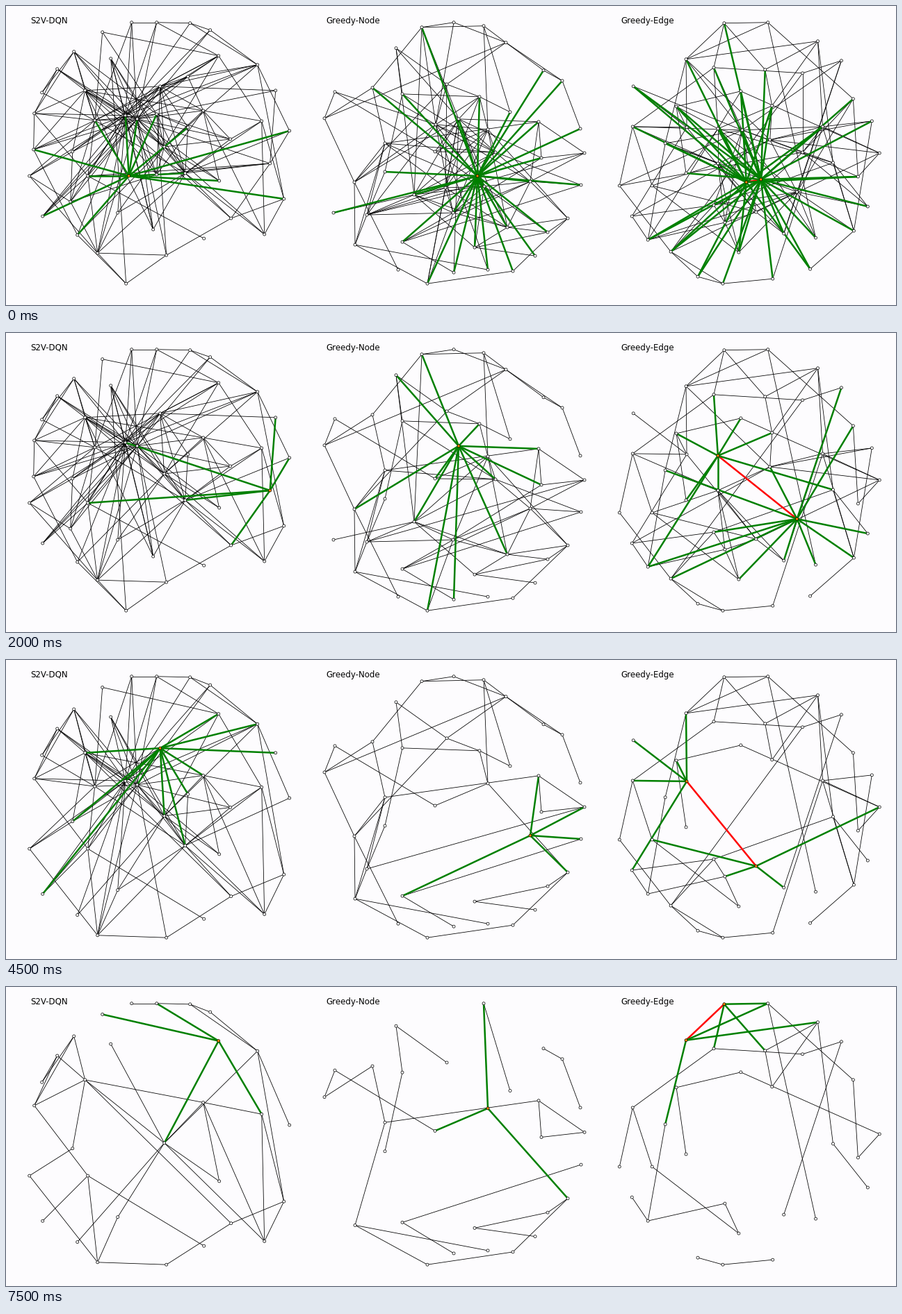
Write a matplotlib script that moves like this. It is 1280x431 px and loops after 8 s.

```python
import matplotlib.pyplot as plt
import numpy as np
from matplotlib.animation import FuncAnimation
from matplotlib.collections import LineCollection

W, H, DPI = 1280, 431, 80
PX = 72 / DPI
TOP, SPAN_X, SPAN_Y = 23.7, 374, 376.5
FRAMES, INTERVAL = 16, 500


class Graph:
    """A graph that loses the hubs of one cover step after another."""

    def __init__(self, title, left, steps, hold, points):
        self.title, self.left = title, left
        self.steps, self.hold = steps, hold
        self.points = np.array(points, float)
        self.edges = []

    def link(self, a, b):
        edge = (min(a, b), max(a, b))
        if edge not in self.edges:
            self.edges.append(edge)

    def star(self, hub, *others):
        for other in others:
            self.link(hub, other)

    def path(self, *nodes):
        for a, b in zip(nodes, nodes[1:]):
            self.link(a, b)

    def setup(self, ax):
        ax.text(self.left + 2, 25, self.title, fontsize=11.8 * PX,
                family="DejaVu Sans", va="baseline")
        self.lines = ax.add_collection(LineCollection([], zorder=1))
        self.dots = ax.scatter([], [], s=13, lw=0.7 * PX,
                               edgecolors="black", zorder=2)

    def draw(self, frame):
        step = frame // self.hold
        gone = {n for hubs in self.steps[:step] for n in hubs}
        hubs = set(self.steps[step])
        alive = [e for e in self.edges if not gone & set(e)]
        nodes = sorted({n for e in alive for n in e})

        # the view always fits the nodes that are left
        low = self.points[nodes].min(axis=0)
        high = self.points[nodes].max(axis=0)
        pos = (self.points - low) / (high - low) * (SPAN_X, SPAN_Y)
        pos += (self.left, TOP)

        touched = lambda e: len(hubs & set(e))
        rank = {0: 0, 2: 1, 1: 2}
        alive.sort(key=lambda e: rank[touched(e)])
        self.lines.set_segments([pos[list(e)] for e in alive])
        self.lines.set_color([("black", "green", "red")[touched(e)] for e in alive])
        self.lines.set_linewidth([(2.5 if touched(e) else 0.8) * PX for e in alive])

        nodes.sort(key=lambda n: n in hubs)
        self.dots.set_offsets(pos[nodes])
        self.dots.set_facecolor(["#ff8c00" if n in hubs else "white" for n in nodes])
        return self.lines, self.dots


def learned():
    order = [30, 46, 23, 14, 33, 38, 40, 26, 45, 13, 19, 31, 21, 22, 20, 5]
    g = Graph("S2V-DQN", 33.7, [[n] for n in order], 1, [
        (181, 24), (217, 24), (265, 25), (294, 35), (139, 38), (306, 72),
        (362, 85), (98, 66), (151, 76), (74, 91), (52, 125), (41, 155),
        (114, 122), (222, 116), (262, 102), (388, 122), (284, 151), (368, 166),
        (408, 180), (323, 192), (128, 165), (172, 158), (189, 163), (217, 156),
        (262, 175), (228, 203), (40, 207), (96, 210), (34, 245), (118, 245),
        (177, 245), (258, 241), (307, 252), (380, 227), (400, 278), (324, 306),
        (372, 329), (53, 303), (93, 282), (161, 298), (212, 322), (103, 330),
        (132, 356), (231, 359), (285, 335), (173, 400), (217, 243)])
    g.star(30, 26, 37, 41, 29, 20, 21, 22, 23, 24, 18, 34, 32, 31)
    g.star(46, 38, 12, 16, 25, 31, 21, 22, 29, 33, 13)
    g.star(23, 4, 7, 15, 19, 20, 22, 24, 31, 25, 43)
    g.star(14, 5, 6, 13, 16, 20, 21, 22)
    g.star(33, 15, 18, 29, 31, 35, 21)
    g.star(38, 28, 27, 21, 22, 42, 20)
    g.star(40, 8, 12, 21, 22, 31)
    g.star(26, 11, 12, 20, 21, 22, 41)
    g.star(45, 8, 41, 42, 43)
    g.star(13, 37, 15, 21, 5, 6, 24, 25, 22, 12, 16, 27, 31)
    g.star(19, 16, 17, 22, 25, 31)
    g.star(31, 8, 20, 24, 17, 18, 35, 36, 39, 42, 25, 22)
    g.star(21, 0, 1, 2, 3, 5, 6, 7, 8, 9, 11, 12, 22, 25, 27, 28, 29, 37, 39,
           41, 42)
    g.star(22, 0, 1, 3, 6, 7, 8, 9, 12, 16, 20, 25, 27, 29, 32, 37, 42, 43)
    g.star(20, 0, 4, 7, 10, 11, 12, 28, 29, 5)
    g.star(5, 4, 1, 25, 17)
    g.path(0, 1, 2, 3, 6, 2)
    g.path(11, 7, 10, 9, 11, 12, 16, 17, 34, 36, 16, 25, 6, 34, 35, 43, 42)
    g.path(11, 29, 42, 28, 27, 12, 25, 32, 16)
    g.path(7, 12, 9)
    g.path(12, 35)
    g.path(8, 25, 36, 17)
    g.path(41, 25, 39, 42)
    g.path(37, 29, 44)
    g.path(6, 18)
    return g


def greedy_node():
    order = [27, 28, 16, 26, 17, 34, 44, 21, 31, 29, 3, 11, 25, 32, 0, 18]
    g = Graph("Greedy-Node", 458, [[n] for n in order], 1, [
        (598, 31), (644, 24), (687, 29), (719, 53), (561, 61), (773, 93),
        (800, 108), (527, 118), (473, 124), (570, 127), (634, 113), (681, 131),
        (725, 153), (458, 162), (766, 167), (826, 177), (618, 171), (651, 163),
        (693, 178), (832, 212), (770, 219), (704, 211), (617, 210), (545, 198),
        (545, 239), (501, 254), (632, 262), (678, 245), (688, 260), (754, 253),
        (827, 258), (587, 272), (519, 301), (471, 298), (643, 298), (502, 344),
        (570, 340), (564, 380), (606, 400), (644, 384), (693, 380), (729, 382),
        (674, 348), (761, 360), (721, 319), (779, 326), (808, 306)])
    g.star(27, 0, 7, 9, 33, 31, 24, 36, 38, 39, 34, 40, 41, 43, 45, 44, 30, 29,
           20, 15, 14, 6, 5, 12, 11, 17, 42, 28)
    g.star(28, 16, 17, 22, 23, 26, 29, 31, 34, 42, 43, 44, 45, 32)
    g.star(16, 0, 1, 7, 8, 10, 11, 18, 21, 29, 25, 32, 34, 40)
    g.star(26, 38, 10, 11, 17, 18, 21, 23, 31, 32, 34, 44)
    g.star(17, 0, 4, 11, 14, 20, 21, 22, 44, 39, 38, 31, 25)
    g.star(34, 18, 20, 31, 32, 36, 38, 44, 29)
    g.star(44, 18, 29, 31, 42, 45, 46)
    g.star(21, 9, 18, 22, 23, 30, 31, 29)
    g.star(31, 0, 4, 18, 33, 32, 42)
    g.star(29, 14, 19, 30, 36, 46)
    g.star(3, 1, 2, 5, 6, 10, 13)
    g.star(11, 9, 10, 12, 18)
    g.star(25, 10, 13, 23, 35, 37)
    g.star(32, 19, 23, 24, 35)
    g.star(0, 1, 2, 7)
    g.star(18, 2, 22, 46)
    g.path(2, 12)
    g.path(10, 4, 9, 24)
    g.path(22, 8, 13, 7, 23, 35, 38, 41, 46, 45, 42, 43)
    g.path(23, 14, 19, 20, 14)
    g.path(5, 6, 15)
    g.path(30, 36, 39)
    g.path(35, 40)
    return g


def greedy_edge():
    pairs = [(29, 30), (17, 20), (16, 31), (19, 24),
             (15, 33), (32, 37), (18, 41), (0, 3)]
    g = Graph("Greedy-Edge", 882.3, pairs, 2, [
        (1033, 25), (1096, 24), (1168, 51), (978, 77), (1202, 79), (1018, 89),
        (1092, 92), (1146, 97), (902, 116), (1057, 123), (1102, 144),
        (964, 145), (1219, 134), (1246, 166), (901, 174), (979, 175),
        (1024, 177), (1059, 179), (1175, 174), (1099, 193), (1146, 211),
        (948, 198), (1257, 212), (1190, 226), (1024, 227), (978, 241),
        (1226, 246), (929, 259), (882, 259), (1065, 254), (1086, 250),
        (1138, 268), (1018, 287), (1079, 297), (1034, 312), (900, 303),
        (923, 337), (956, 354), (1054, 355), (1119, 328), (1165, 334),
        (1220, 324), (1240, 289), (1157, 379), (1103, 393), (1031, 400),
        (995, 390)])
    for a, b in pairs:
        g.link(a, b)
    g.star(29, 3, 8, 9, 11, 14, 16, 18, 21, 24, 26, 36, 37, 38, 46, 10, 43)
    g.star(30, 0, 5, 6, 8, 9, 10, 11, 12, 13, 16, 17, 25, 26, 32, 36, 37, 38,
           39, 40, 41, 42, 43, 44, 45, 46, 18)
    g.star(17, 3, 5, 8, 14, 21, 28, 4, 23, 18, 32, 34, 33, 40)
    g.star(20, 7, 12, 42, 26, 28, 34, 18)
    g.star(16, 5, 9, 10, 11, 23, 24, 25, 36)
    g.star(31, 4, 12, 19, 21, 32, 36, 37, 38, 39, 40, 41, 42)
    g.star(19, 3, 10, 13, 18, 22, 35)
    g.star(24, 14, 21, 27, 33, 34, 38, 39)
    g.star(15, 3, 8, 11, 14, 35)
    g.star(33, 22, 27, 34, 39)
    g.star(32, 23, 34, 35)
    g.star(37, 7, 28, 45, 46)
    g.star(18, 2, 13, 22, 44)
    g.star(41, 13, 23, 43)
    g.star(0, 1, 5, 6)
    g.star(3, 1, 2, 21)
    g.path(40, 1, 12, 26, 22, 9, 11, 25)
    g.path(42, 23, 2, 6, 10, 2)
    g.path(28, 14, 5, 7, 4, 39)
    g.path(14, 27, 38, 34, 36, 35)
    g.path(36, 21)
    g.path(46, 45, 44)
    return g


fig = plt.figure(figsize=(W / DPI, H / DPI), dpi=DPI, facecolor="#fdfcfe")
ax = fig.add_axes([0, 0, 1, 1])
ax.set_xlim(0, W)
ax.set_ylim(H, 0)
ax.axis("off")

graphs = [learned(), greedy_node(), greedy_edge()]
for graph in graphs:
    graph.setup(ax)


def update(frame):
    return [artist for graph in graphs for artist in graph.draw(frame)]


anim = FuncAnimation(fig, update, frames=FRAMES, interval=INTERVAL,
                     repeat=True, repeat_delay=0, blit=False)
plt.show()
```
